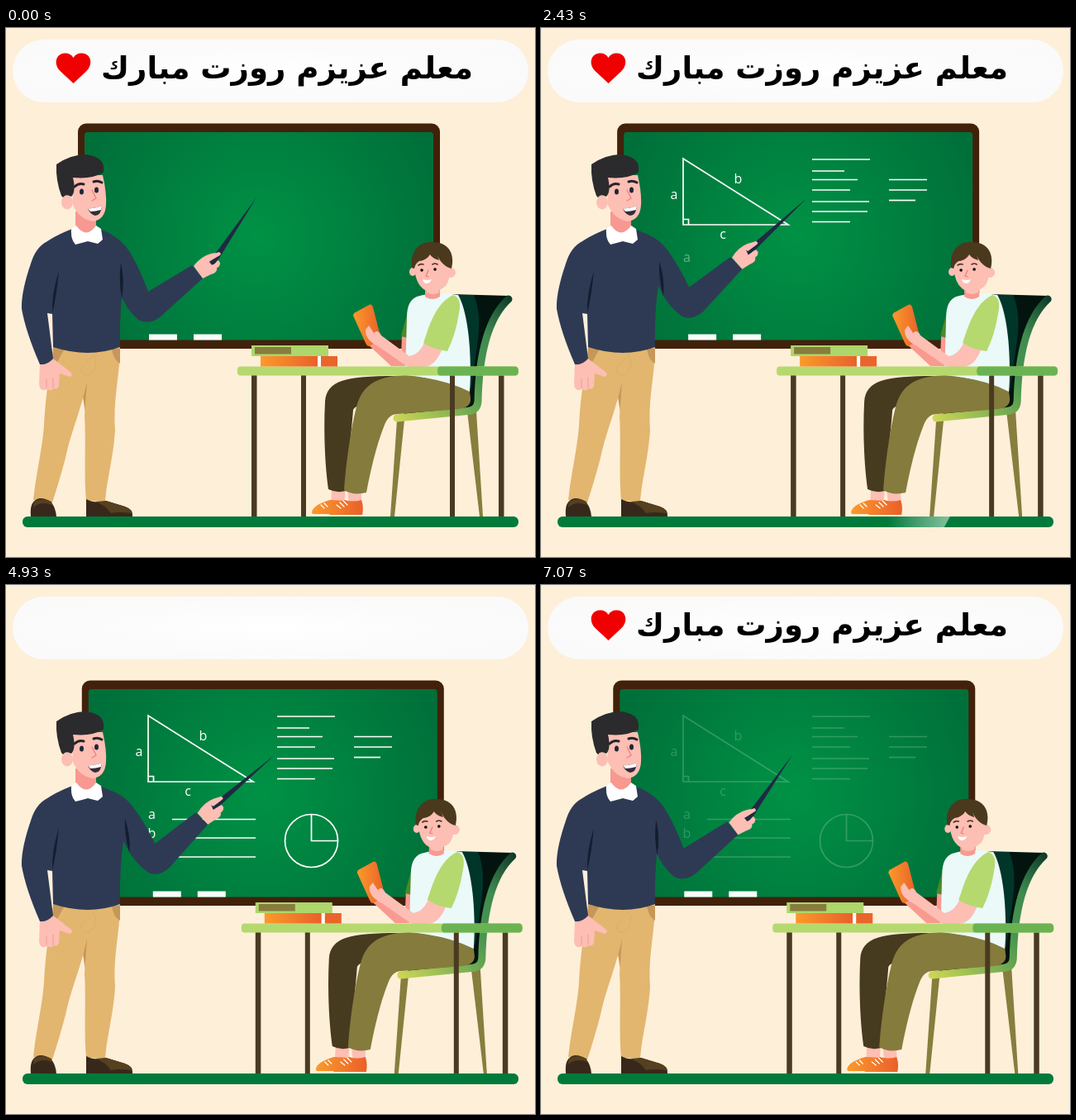
Animation of 640x640 px, one loop 7140 ms. Source, as an HTML page:

```html
<!DOCTYPE html>
<html lang="fa">
<head>
<meta charset="utf-8">
<title>Classroom</title>
<style>
html, body { margin: 0; width: 100%; height: 100%; overflow: hidden; background: #feefd9 }
svg { display: block; width: 100%; height: 100% }
#words { font: bold 40px "DejaVu Sans", sans-serif; text-anchor: middle }
#chalk { fill: none; stroke: #fff; stroke-width: 1.7 }
#chalk text { font: 16px "Open Sans", sans-serif; fill: #fff; stroke: none; text-anchor: middle }
.skin { fill: #fdbeb4 }
.line { fill: none; stroke-linecap: round }
</style>
</head>
<body>
<svg viewBox="0 0 640 640">
<defs>
  <radialGradient id="green" gradientUnits="userSpaceOnUse" cx="306" cy="252" r="225">
    <stop stop-color="#009245"/><stop offset="1" stop-color="#00703a"/>
  </radialGradient>
  <radialGradient id="pill"><stop stop-color="#fff"/><stop offset="1" stop-color="#fafafa"/></radialGradient>
  <linearGradient id="orange"><stop stop-color="#fb9a2b"/><stop offset="1" stop-color="#e9602a"/></linearGradient>
  <linearGradient id="frame" gradientUnits="userSpaceOnUse" x1="470" y1="472" x2="625" y2="325">
    <stop stop-color="#ccd656"/><stop offset=".5" stop-color="#479550"/><stop offset=".7" stop-color="#3f8b50"/><stop offset="1" stop-color="#032a20"/>
  </linearGradient>
  <linearGradient id="glow"><stop stop-color="#fff" stop-opacity="0"/><stop offset="1" stop-color="#d9f0dc" stop-opacity=".6"/></linearGradient>
  <clipPath id="floor"><rect x="20" y="591" width="600" height="13" rx="6"/></clipPath>
</defs>

<rect width="640" height="640" fill="#feefd9"/>
<rect x="8" y="14" width="624" height="76" rx="38" fill="url(#pill)"/>
<g id="title">
  <text id="words" x="340" y="61" direction="rtl">معلم عزیزم روزت مبارك</text>
  <path fill="#f00000" d="M81.500 67L66 52.500C57 44 60 31 71 30.500Q78 30 81.500 36Q85 30 92 30.500C103 31 106 44 97 52.500Z"/>
</g>

<g class="slide">
  <rect x="87" y="115.500" width="438" height="272.500" rx="10" fill="#42210b"/>
  <rect x="95" y="126" width="422" height="251.500" rx="4" fill="url(#green)"/>
  <path fill="#f7fffa" d="M173 370.500h34v7h-34zM227 370.500h34v7h-34z"/>
</g>
<g id="chalk"></g>

<g clip-path="url(#floor)">
  <path fill="#007a3b" d="M20 591h600v13H20z"/>
  <path id="shine" fill="url(#glow)" d="M-75 591H0L-7 604H-75Z"/>
</g>

<!-- pupil, chair and desk -->
<g class="slide">
  <path fill="#877d3d" d="M473 474h9L470 591h-5ZM558 464h11L577 591h-4Z"/>
  <path fill="#03140f" d="M538 322L609 324C582 345 571 395 570 462L474 470L550 435Z"/>
  <path fill="#00352a" d="M545 323H566Q576 345 570 385L562 440Z"/>
  <path class="line" stroke="url(#frame)" stroke-width="9" d="M608 328C582 352 572 400 571 452Q570 463 558 463.500L473 472"/>
  <path class="skin" d="M394 556h17l-2 22h-16zM413 557h17v20h-15z"/>
  <path fill="url(#orange)" d="M370 586Q371 577 392 571L411 572V588H373Q370 588 370 586ZM390 586Q392 577 410 571Q420 574 430 571Q433 580 431 589H393Q390 589 390 586Z"/>
  <path class="line" stroke="#fff" stroke-width="1.200" d="M381 577l4 4M385 575l4 4M400 577l5 4M404 574l5 5M408 572l5 5"/>
  <path fill="#463a1f" d="M470 421C412 421 388 426 386 452C384 490 386 530 390 558Q400 563 411 560C413 530 418 490 420 462Q422 457 432 456L470 440Z"/>
  <path fill="#857b3c" d="M490 420C450 420 432 430 424 458C416 490 411 530 409 559Q420 566 436 562C441 535 448 505 458 480Q463 467 474 467L548 461Q563 459 562 448L560 432Z"/>
  <path fill="#4b8a26" d="M487 340L478 372L486 376Z"/>
  <path fill="#f99a90" d="M479 373L486 375V398L478 396ZM446 378L486 409H466L438 383Z"/>
  <path fill="#ebf9f9" d="M497 325Q485 330 485 350L483 420Q530 424 561 440C564 400 560 345 547 323Q520 318 497 325Z"/>
  <path fill="#f99a90" d="M507 315h18v10q-9 6-18 0z"/>
  <path class="skin" d="M509 315h15v5q-8 4-15 0z"/>
  <ellipse class="skin" cx="538" cy="296" rx="6" ry="6"/>
  <ellipse class="skin" cx="492" cy="295" rx="4" ry="5"/>
  <path class="skin" d="M494 280Q515 258 537 282Q539 302 532 312Q523 320 512 319Q496 315 494 290Z"/>
  <path fill="#4a391c" d="M491 290C488 266 505 257 517 259C537 260 543 274 539 291C530 289 524 281 521 273Q523 278 524 281Q516 279 513 274Q509 281 500 282Q495 285 494 291Z"/>
  <path class="line" stroke="#4a391c" stroke-width="1.600" d="M499 287q3-2 6-1M516 286q3-2 6 0"/>
  <circle cx="503" cy="293" r="1.800"/><circle cx="519" cy="292" r="1.800"/>
  <path class="line" stroke="#ee7e78" stroke-width="1.300" d="M511 293l-3 7 3 1"/>
  <path fill="#fff" d="M504 304q6 2 11 0q-2 5-6 5q-4 0-5-5z"/>
  <path fill="url(#orange)" d="M421 345L440 334.500Q443 334 444 338L454 377L439 385Q436 384 435 381L420 348Z"/>
  <path class="skin" d="M506 381L527 390Q519 409 506 410H486L450 385Q434 377 435 365L439 360L445 369Q450 364 454 372L488 397Q500 395 506 381Z"/>
  <path fill="#b5d96f" d="M541 323Q552 326 548 345Q544 371 534 391Q517 389 505 381C512 360 520 333 541 323Z"/>
  <path fill="#4a3a22" d="M297 420h6.500v171H297zM357 420h6v171h-6zM537 420h6v171h-6zM596 420h6.500v171H596z"/>
  <rect x="280" y="409.500" width="340" height="11" rx="4" fill="#b5d96f"/>
  <path fill="#6bb352" d="M525 409.500H616Q620 410 620 415Q620 420 616 420.500H525Q522 420 522 415Q522 410 525 409.500Z"/>
  <path fill="url(#orange)" d="M308 397h69v12.500h-69z"/>
  <path fill="#fff" d="M377 397h4v12.500h-4z"/>
  <path fill="#e9652b" d="M381 397h20v12.500h-20z"/>
  <path fill="#add66c" d="M297 384h93v13h-93z"/>
  <path fill="#877d3d" d="M301 386h44v8.500h-44z"/>
</g>

<!-- teacher -->
<path fill="#c6975a" d="M92 440L98 425V478Z"/>
<path fill="#e2b66f" d="M58 384L138 386C138 420 129 450 132 486C130 520 122 545 120 573L97 572C94 540 97 500 95 470L98 428C90 465 78 490 72 520Q64 550 56 574L33 571C36 540 44 510 46 480C48 440 54 410 58 384Z"/>
<path fill="#c6975a" d="M57 386H72L62 404L56 402ZM128 388H138V406Q130 402 128 388Z"/>
<path class="line" stroke="#d8ac64" stroke-width=".8" d="M106 396Q113 408 103 418Q92 424 91 412Q100 401 106 396"/>
<path fill="#38281b" d="M30 591Q28 571 41 569Q59 569 61 591ZM97 570Q108 576 121 572L144 579Q154 582 153 591H97Z"/>
<path fill="#55401f" d="M34 573Q44 567 55 573L56 577Q42 572 33 580ZM108 573L121 572L144 579Q152 582 152 587Q135 585 127 587Q120 577 108 573Z"/>
<path class="skin" d="M41 405L57 400L78 416Q82 420 77 422L65 418L64 433Q62 438 58 436Q54 440 50 437Q41 441 40 431Z"/>
<path class="line" stroke="#f29b94" d="M49 425v10M57 423v12"/>
<path fill="#2e3a54" d="M50 258Q62 250 80 243Q97 262 115 244Q132 249 140 264L142 310Q137 345 138 386Q100 400 57 386L56 346L50 345L57 400Q50 408 41 407Q24 368 19 340Q18 320 30 285Q36 265 50 258Z"/>
<path fill="#141d30" d="M64 294Q61 325 56 345Q55 322 64 294Z"/>
<path fill="#f79891" d="M84 222H109V246Q97 257 84 245Z"/>
<path fill="#fff" d="M79 243L85 239Q97 256 109 239L115 243L117 256L111 261L99 258L84 262Q78 256 79 243Z"/>
<ellipse class="skin" cx="74" cy="211" rx="7" ry="8.500"/>
<path class="skin" d="M79 178H117Q122 200 121 214Q120 232 105 234Q88 231 81 214Z"/>
<path fill="#2b2b2d" d="M67 203Q60 184 61 165Q78 153 97 153Q117 156 118 168Q119 177 115 176Q104 183 81 181Q85 198 79 204Q72 200 69 205Z"/>
<path class="line" stroke="#25262a" stroke-width="3" d="M83 192Q88 187 94 189M106 186Q111 184 116 187"/>
<ellipse cx="91.500" cy="198" rx="2.500" ry="3.500" fill="#20273a"/>
<ellipse cx="109.500" cy="196" rx="2.500" ry="3.500" fill="#20273a"/>
<path class="line" stroke="#ef817c" stroke-width="1.300" d="M104 196l5 10-5 3"/>
<path fill="#352c39" d="M99 218Q108 219 116 215Q115 227 108 227Q102 226 99 218Z"/>
<path fill="#fff" d="M99 218Q108 219 116 215L115 220Q108 222 102 222Z"/>

<g id="arm">
  <path fill="#2e3a54" d="M118 246Q141 254 152 275Q163 294 172 319L225 287L238 303L186 350Q172 360 160 353Q145 340 138 321L120 280Z"/>
  <path fill="#141d30" d="M139 284Q144 306 140 327Q136 305 139 284Z"/>
  <path class="skin" d="M227 288Q236 276 248 273L258 271Q262 274 255 279L259 284Q259 289 255 290Q256 296 248 298L238 303Z"/>
  <path id="pointer" fill="#1f2a42" d="M246 283L250 288L257 280L303 205L251 276Z"/>
  <path class="skin" d="M240 277L258 271Q262 274 257 276L247 282ZM248 287L257 284Q260 288 255 290L246 293Z"/>
</g>
</svg>

<script>
const LOOP = 7140;
const $ = id => document.getElementById(id);
const clamp = v => Math.max(0, Math.min(1, v));

// Chalk marks in the order in which they appear
const path = d => `<path d="${d}"/>`;
const rule = (x, y, end) => path(`M${x} ${y}H${end}`);
const label = (s, x, y) => `<text x="${x}" y="${y}">${s}</text>`;
const marks = [
  path('M172 158V238H299ZM172 231.500h6.500v6.500'),
  label('a', 161, 207), label('b', 238.5, 188), label('c', 220, 255),
  ...[[159, 398], [173, 367], [183.5, 383], [196, 374], [210, 397], [222, 395], [234.5, 374]]
    .map(([y, end]) => rule(328, y, end)),
  ...[[183.5, 467], [196, 467], [208.5, 453]].map(([y, end]) => rule(421, y, end)),
  ...[283.5, 306, 329].flatMap((y, i) => [label('abc'[i], 176.5, y - .5), rule(201, y, 302)]),
  path('M401.500 309.500a32 32 0 1 1-64 0a32 32 0 1 1 64 0'),
  path('M369.500 277.500v32h32')
];
$('chalk').innerHTML = marks.join('');

// Title set at the size that fills the banner
const words = $('words');
words.style.fontSize = 40 * 450 / words.getComputedTextLength() + 'px';

const shineStops = [[1900, 620], [2430, 495], [3290, 295], [4140, 118], [4750, 0]];
function shineX(t) {
  for (let i = 1; i < shineStops.length; i++) {
    const [t0, x0] = shineStops[i - 1], [t1, x1] = shineStops[i];
    if (t >= t0 && t < t1) return x0 + (x1 - x0) * (t - t0) / (t1 - t0);
  }
  return -100;
}

function draw(now) {
  const t = now % LOOP;

  const shift = 7.6 * (1 - Math.abs(t / 3600 - 1));
  document.querySelectorAll('.slide').forEach(g => g.setAttribute('transform', `translate(${shift})`));

  const swing = Math.sin(Math.PI * (t % 3570 / 3570) ** .94);
  $('arm').setAttribute('transform', `rotate(${-6.6 * swing} 120 240)`);
  $('pointer').setAttribute('transform', `rotate(${23 * swing} 253 278)`);

  [...$('chalk').children].forEach((m, i) => m.setAttribute('opacity', clamp((t - 94 - 163 * i) / 140)));
  $('chalk').setAttribute('opacity', clamp((LOOP - t) / 350));

  $('shine').setAttribute('transform', `translate(${shineX(t)})`);

  const away = t < 4500 ? 0 : clamp((6790 - t) / 1610) ** 2;
  $('title').setAttribute('transform', `translate(${40 * away})`);
  $('title').setAttribute('opacity', t < 4500 ? clamp((3700 - t) / 600) : 1 - away);

  requestAnimationFrame(() => draw(performance.now()));
}
draw(0);
</script>
</body>
</html>
```
